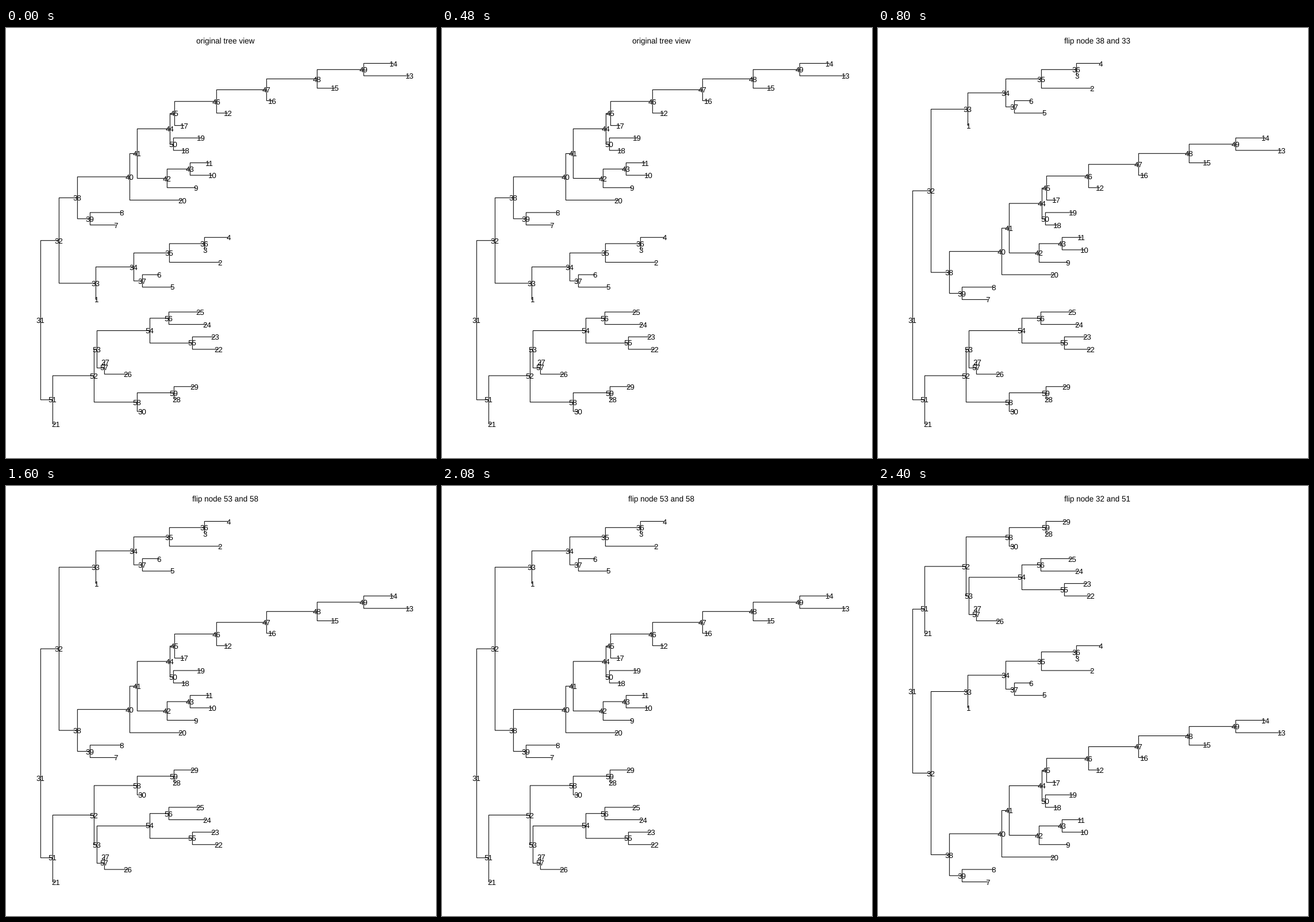
Write a matplotlib script that moves like this. It is 748x748 px and loops after 3200 ms.

```python
from itertools import count

import matplotlib.pyplot as plt
from matplotlib.animation import FuncAnimation

SIZE, DPI = 748, 64
PX = 72 / DPI  # points per pixel
TOP, STEP = 61.5, 21.626  # first leaf row and leaf spacing
ROOT = 31

plt.rcParams.update({
    "font.family": "Liberation Sans",
    "text.hinting": "none",
})

# A clade is (branch length, child, child); a leaf is just its branch length.
TREE = (60.3,
        (32,
         (64, 1, (66, (62, 88, (61, 1, 42)), (15, 52, 29))),
         (32,
          (22, 45, 55),
          (91,
           (13,
            (52, 50, (40, 39, 34)),
            (57,
             (8, (73, 20, (87, (88, (81, 80, 52), 31), 10)), 17),
             (6, 21, 48))),
           91))),
        (21,
         5,
         (72,
          (5, (92, (74, 45, 39), (33, 66, 54)), (13, 40, 1)),
          (75, (64, 4, 35), 9))))
FLIPS = [(38, 33), (53, 58), (32, 51)]

xs, kids, parent = {}, {}, {}
leaf_ids, inner_ids = count(1), count(ROOT)


def clade(node):
    return [node] + [n for kid in kids.get(node, ()) for n in clade(kid)]


def leaves(node):
    return [n for n in clade(node) if n not in kids]


def grow(branch, start=0):
    """Number the nodes in preorder and put the larger clade on top."""
    if not isinstance(branch, tuple):
        node = next(leaf_ids)
        xs[node] = start + branch
        return node
    node = next(inner_ids)
    xs[node] = start + branch[0]
    pair = [grow(child, xs[node]) for child in branch[1:]]
    kids[node] = sorted(pair, key=lambda n: (len(leaves(n)), n), reverse=True)
    parent.update((kid, node) for kid in pair)
    return node


def mean_slot(slots, node):
    return sum(slots[kid] for kid in kids[node]) / 2


def first_layout():
    slots = {leaf: i for i, leaf in enumerate(leaves(ROOT))}
    for node in reversed(clade(ROOT)):
        if node in kids:
            slots[node] = mean_slot(slots, node)
    return slots


def flip(slots, upper, lower):
    """Swap two sibling clades; only their direct parent is re-centred."""
    new = dict(slots)
    for n in clade(upper):
        new[n] += len(leaves(lower))
    for n in clade(lower):
        new[n] -= len(leaves(upper))
    new[parent[upper]] = mean_slot(new, parent[upper])
    return new


grow(TREE)
layouts = [first_layout()]
titles = ["original tree view"]
for a, b in FLIPS:
    layouts.append(flip(layouts[-1], a, b))
    titles.append(f"flip node {a} and {b}")

fig = plt.figure(figsize=(SIZE / DPI, SIZE / DPI), dpi=DPI, facecolor="white")
ax = fig.add_axes([0, 0, 1, 1])
ax.set_xlim(0, SIZE)
ax.set_ylim(SIZE, 0)
ax.axis("off")

branches = {
    kid: ax.plot([], [], color="black", lw=1.07 * PX, snap=False,
                 solid_capstyle="butt", solid_joinstyle="miter")[0]
    for kid in parent
}
labels = {
    n: ax.text(x, 0, str(n), size=13.2 * PX, ha="center", va="baseline",
               zorder=3)
    for n, x in xs.items()
}
title = ax.text(381.2, 27, "", size=13.5 * PX, ha="center", va="baseline")


def draw(i):
    rows = {n: TOP + STEP * slot for n, slot in layouts[i].items()}
    for kid, line in branches.items():
        node = parent[kid]
        line.set_data([xs[node], xs[node], xs[kid]],
                      [rows[node], rows[kid], rows[kid]])
    for n, label in labels.items():
        label.set_y(rows[n] + 5)
    title.set_text(titles[i])
    return [*branches.values(), *labels.values(), title]


anim = FuncAnimation(fig, draw, frames=len(layouts), interval=800,
                     repeat=True, repeat_delay=0)
plt.show()
```
